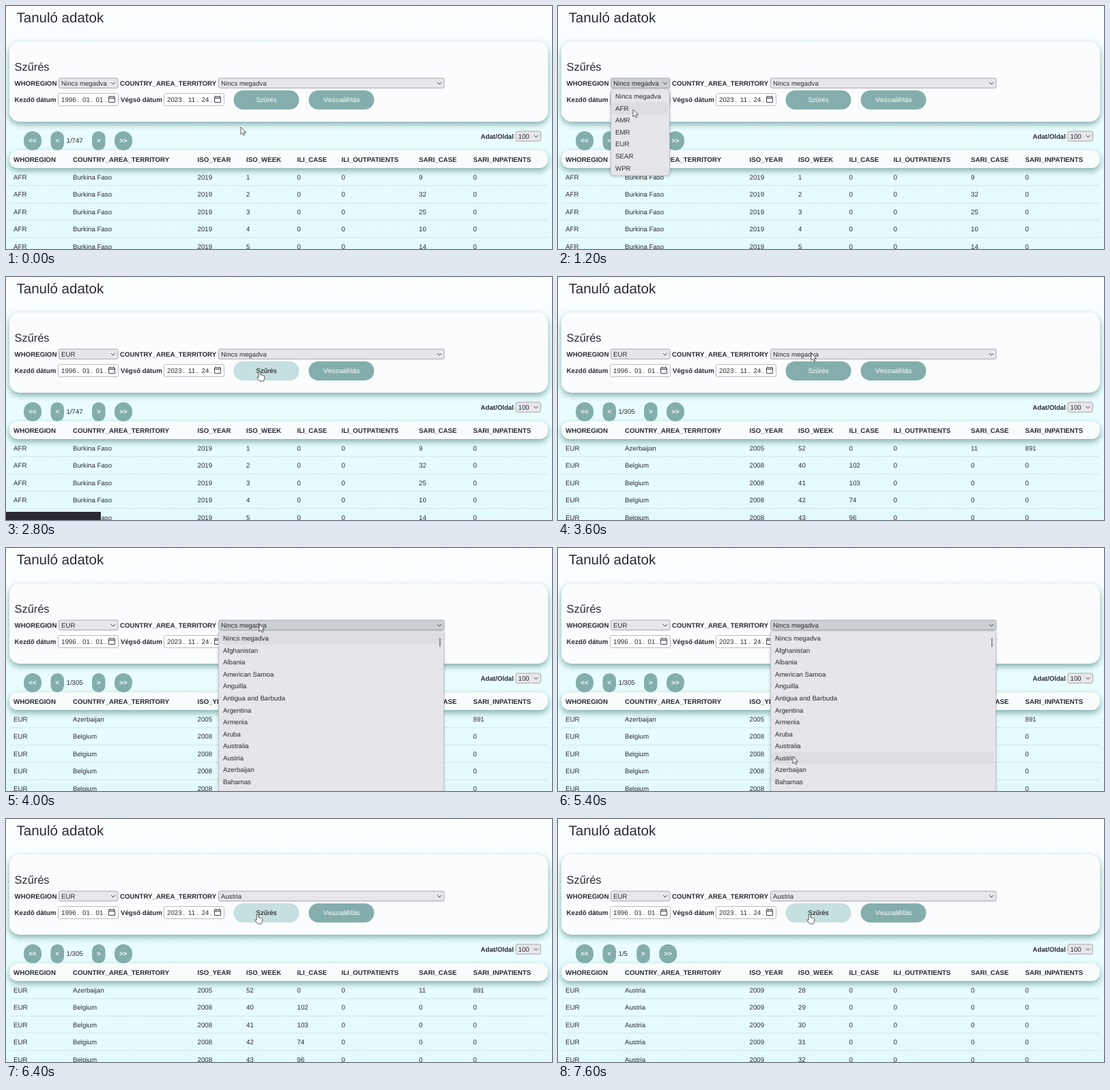
An HTML page for the animation above (8000 ms loop, 800 px wide and 357 px high).

```html
<!DOCTYPE html>
<html lang="hu">
<head>
<meta charset="utf-8">
<style>
  html, body { margin: 0; width: 100%; height: 100%; overflow: hidden; }
  svg { display: block; width: 800px; height: 357px; }
  text {
    font: 9.7px "Liberation Sans", Arial, sans-serif; fill: #2a2a32;
    white-space: pre; text-rendering: geometricPrecision;
  }
  .bold { font-weight: bold; }
  .title { font-size: 20.5px; }
  .heading { font-size: 16.4px; }
  .mid { text-anchor: middle; }
  .light { fill: #fff; }
  .dark { fill: #000; }
  .panel { fill: #fafcfe; filter: drop-shadow(0 4px 5px #83aeac); }
  .head { fill: #f8fcfd; filter: drop-shadow(0 4px 5px #83aeac); }
  .popup { fill: #e6e5eb; stroke: #b9b9c1; stroke-width: .8; filter: drop-shadow(0 1px 2px #0003); }
  .field { fill: #fff; stroke: #b4b4be; stroke-width: .9; }
  .line { fill: none; stroke: #44444e; }
  .pointer { fill: #fff; stroke: #333; stroke-width: .8; stroke-linejoin: round; }
</style>
</head>
<body>
<svg viewBox="0 0 800 357">
  <defs>
    <linearGradient id="sky" x2="0" y2="1">
      <stop offset="0" stop-color="#fcfdff"/>
      <stop offset=".15" stop-color="#f8feff"/>
      <stop offset=".55" stop-color="#e9fdfe"/>
      <stop offset="1" stop-color="#e2fafc"/>
    </linearGradient>
  </defs>
  <rect width="800" height="357" fill="url(#sky)"/>
  <g id="scene"></g>
</svg>
<script>
const STEP = 200, LOOP = 8000;
const TEAL = '#83aeac', PALE = '#c6dfe0';
const NONE = 'Nincs megadva';
const regions = [NONE, 'AFR', 'AMR', 'EMR', 'EUR', 'SEAR', 'WPR'];
const countries = [NONE, 'Afghanistan', 'Albania', 'American Samoa', 'Anguilla',
  'Antigua and Barbuda', 'Argentina', 'Armenia', 'Aruba', 'Australia', 'Austria',
  'Azerbaijan', 'Bahamas'];
const columns = [
  [11, 'WHOREGION'], [98, 'COUNTRY_AREA_TERRITORY'], [280.5, 'ISO_YEAR'], [352, 'ISO_WEEK'],
  [426.5, 'ILI_CASE'], [491.5, 'ILI_OUTPATIENTS'], [605, 'SARI_CASE'], [684.5, 'SARI_INPATIENTS']];

const tables = {
  africa: { pages: 747, rows: [9, 32, 25, 10, 14].map((sari, i) =>
    ['AFR', 'Burkina Faso', 2019, i + 1, 0, 0, sari, 0]) },
  europe: { pages: 305, rows: [['EUR', 'Azerbaijan', 2005, 52, 0, 0, 11, 891],
    ...[102, 103, 74, 96].map((ili, i) => ['EUR', 'Belgium', 2008, 40 + i, ili, 0, 0, 0])] },
  austria: { pages: 5, rows: [28, 29, 30, 31, 32].map(week =>
    ['EUR', 'Austria', 2009, week, 0, 0, 0, 0]) }
};

// Pointer path: time, x, y
const path = [[0, 344, 178], [200, 296, 165], [600, 135, 117], [800, 118, 112], [1200, 110, 152],
  [1800, 104, 200], [2000, 150, 175], [2400, 350, 142], [2600, 371, 139], [3000, 371, 139],
  [3600, 371, 112], [4000, 371, 112], [4400, 362, 180], [5000, 345, 295], [5400, 344, 306],
  [5600, 348, 298], [5800, 367, 235], [6000, 368, 213], [6200, 367, 160], [6400, 368, 140]];

function pointerAt(t) {
  const next = path.findIndex(p => p[0] > t);
  if (next < 0) return path.at(-1).slice(1);
  const [a, b] = [path[next - 1], path[next]], k = (t - a[0]) / (b[0] - a[0]);
  return [a[1] + (b[1] - a[1]) * k, a[2] + (b[2] - a[2]) * k];
}

const text = (x, y, s, cls = '') =>
  `<text x="${x}" y="${y}" class="${cls}">${String(s).replace(/</g, '&lt;')}</text>`;
const rect = (x, y, w, h, r, attrs) =>
  `<rect x="${x}" y="${y}" width="${w}" height="${h}" rx="${r}" ${attrs}/>`;
const fill = color => `fill="${color}"`;

function button(x, y, w, r, label, hover, cls = '') {
  return rect(x, y, w, 28, r, fill(hover ? PALE : TEAL)) +
    text(x + w / 2, y + 17.3, label, `mid ${cls} ${hover ? 'dark' : 'light'}`);
}

function select(x, y, w, value, open) {
  return rect(x + .5, y + .5, w - 1, 14.5, 2, `fill="${open ? '#cccfd4' : '#e6e6eb'}" stroke="#a9a9b3"`) +
    text(x + 4, y + 11.2, value) +
    `<path class="line" d="M${x + w - 10.5} ${y + 6.5}l3 3 3-3"/>`;
}

function popup(x, w, h, items, active) {
  const rowTop = i => 124 + i * 17.55;
  return rect(x + .5, 122, w - 1, h, 2, 'class="popup"') +
    rect(x + 2, rowTop(active), w - 5, 17.5, 2, fill('#dddce2')) +
    items.map((item, i) => text(x + 7, rowTop(i) + 12.2, item)).join('');
}

function dateField(x, parts) {
  return rect(x + .5, 128.5, 88, 18, 2, 'class="field"') +
    [5, 36, 55.5].map((dx, i) => text(x + dx, 141.3, parts[i])).join('') +
    [28.5, 48.5, 68.5].map(dx => text(x + dx, 141.3, '.')).join('') +
    `<path class="line" d="M${x + 74.5} 133.5h9v8h-9zm0 2h9m-7-4v2m5-2v2"/>`;
}

function dataTable({ rows }, hoverRow) {
  let out = '';
  rows.forEach((row, i) => {
    const top = 238.5 + i * 25.4;
    if (i === hoverRow) out += rect(5, top, 789, 25.4, 0, fill(PALE));
    out += rect(5, top + 25, 789, .8, 0, fill('#cde0e2')) +
      row.map((cell, c) => text(columns[c][0], top + 16.5, cell)).join('');
  });
  return out + rect(5, 212, 789, 26, 12, 'class="head"') +
    columns.map(([x, name]) => text(x, 228.8, name, 'bold')).join('');
}

function pager(pages) {
  const label = '1/' + pages, shift = label.length < 5 ? -10.8 : 0;
  return button(26, 184, 26, 13, '<<', false, 'bold') + button(65.5, 184, 19.5, 9.7, '<', false, 'bold') +
    text(88.5, 201.3, label) + button(126 + shift, 184, 19.5, 9.7, '>', false, 'bold') +
    button(159 + shift, 184, 26, 13, '>>', false, 'bold');
}

function pointer([x, y], hand) {
  const shape = hand
    ? 'M-.8.8Q.5-.8 1.8.8V5Q3.2 4 4.2 5.4 5.6 4.8 6.2 6 7.8 5.6 7.8 7.4V10L6.4 14H.8L-3.2 8.6Q-2.6 6.6-.8 8.2Z'
    : 'M0 0V10.6L2.5 8.4 4.2 12 6 11.2 4.4 7.6H7.6Z';
  return `<path class="pointer" transform="translate(${x} ${y})" d="${shape}"/>`;
}

function draw(t) {
  const during = (from, to) => t >= from && t < to;
  const at = pointerAt(t);
  const itemAt = Math.max(0, Math.floor((at[1] - 124) / 17.55));
  const regionOpen = during(800, 2000), countryOpen = during(3800, 5600);
  const hover = during(2400, 3400) || t >= 6200;
  const loading = during(2800, 3000) || during(7200, 7400);
  const table = t < 3000 ? tables.africa : t < 7400 ? tables.europe : tables.austria;
  const hoverRow = during(5600, 5800) ? 2 : during(5800, 6000) ? 1 : -1;

  return text(15.5, 24.3, 'Tanuló adatok', 'title') +
    rect(5, 52, 789, 118, 15, 'class="panel"') +
    text(12.5, 95, 'Szűrés', 'heading') +
    text(12.5, 116.8, 'WHOREGION', 'bold') +
    select(77, 105.5, 87.5, t < 2000 ? NONE : 'EUR', regionOpen) +
    text(167, 116.8, 'COUNTRY_AREA_TERRITORY', 'bold') +
    select(311, 105.5, 331.5, t < 5600 ? NONE : 'Austria', countryOpen) +
    text(12.5, 141.2, 'Kezdő dátum', 'bold') + dateField(76, ['1996', '01', '01']) +
    text(168, 141.2, 'Végső dátum', 'bold') + dateField(231, ['2023', '11', '24']) +
    button(333.5, 124, 96, 14, 'Szűrés', hover) +
    button(443.5, 124, 96, 14, 'Visszaállítás', false) +
    pager(table.pages) +
    text(695.5, 194.5, 'Adat/Oldal', 'bold') + select(746.5, 183.5, 37.5, '100', false) +
    dataTable(table, hoverRow) +
    (regionOpen ? popup(77, 87, 127, regions, itemAt) : '') +
    (countryOpen ? popup(311, 331, 245, countries, itemAt) + rect(635, 132, 1.6, 13.5, .8, fill('#77777f')) : '') +
    (loading ? rect(-2, 345, 141, 14, 1, fill('#2b2a33')) : '') +
    pointer(at, hover);
}

const scene = document.getElementById('scene');
let shown = -1;
function frame(now) {
  const t = Math.floor(now % LOOP / STEP) * STEP;
  if (t !== shown) scene.innerHTML = draw(shown = t);
  requestAnimationFrame(frame);
}
frame(performance.now());
</script>
</body>
</html>
```
